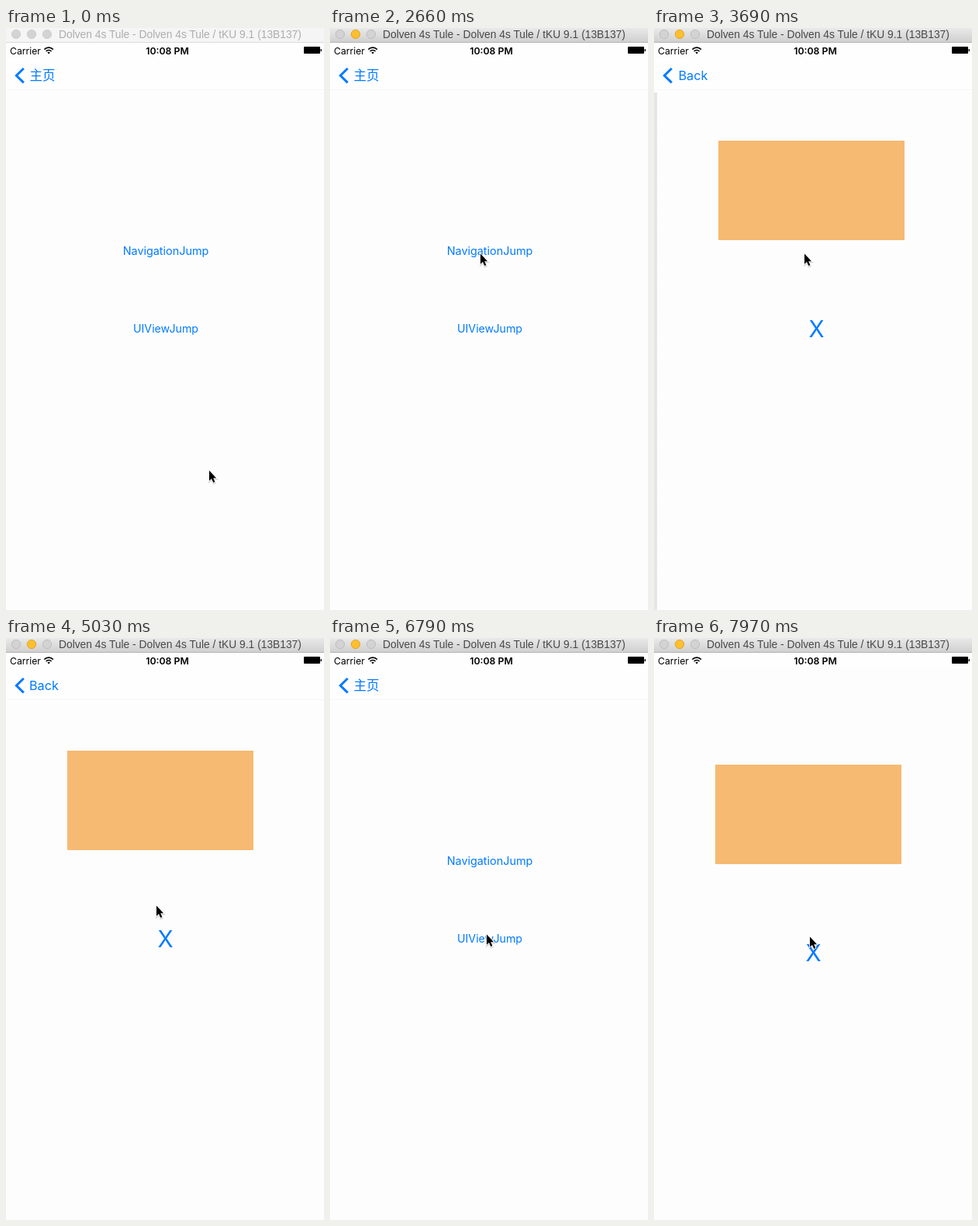
Write an HTML page that moves like this. It is 410 by 749 pixels and loops after 8 s.

```html
<!DOCTYPE html>
<html lang="en">
<head>
<meta charset="utf-8">
<title>View jump</title>
<style>
  html, body { margin: 0; width: 100%; height: 100%; overflow: hidden; background: #fdfdfd; }
  svg { display: block; width: 100%; height: 100%; }
  text { font-family: Inter, sans-serif; }
  .blue { fill: #007aff; }
  .mid { text-anchor: middle; }
  .title { font: 13.8px "Liberation Sans", Arial, sans-serif; }
  .cjk { font-family: "Noto Sans CJK SC", "Noto Sans CJK", sans-serif; }
</style>
</head>
<body>
<svg viewBox="0 0 410 749" preserveAspectRatio="none">
  <defs>
    <linearGradient id="bar" x2="0" y2="1">
      <stop stop-color="#e9e9e9"/><stop offset="1" stop-color="#d0d0d0"/>
    </linearGradient>
    <linearGradient id="edge">
      <stop stop-color="#000" stop-opacity="0"/><stop offset="1" stop-color="#000" stop-opacity=".25"/>
    </linearGradient>
    <g id="card">
      <rect width="410" height="730" y="19" fill="#fdfdfd"/>
      <rect x="79" y="145" width="240" height="128" fill="#f6ba72"/>
    </g>
  </defs>

  <rect width="410" height="749" fill="#fdfdfd"/>
  <g id="home">
    <text class="blue mid" x="206" y="292" font-size="14.4" id="navJump">NavigationJump</text>
    <text class="blue mid" x="206" y="392" font-size="14.2" id="viewJump">UIViewJump</text>
  </g>
  <rect id="dim" y="83" width="410" height="666"/>

  <g id="page">
    <rect id="shadow" x="-7" y="83" width="7" height="666" fill="url(#edge)"/>
    <use href="#card"/>
    <text class="blue mid" x="205.5" y="398" font-size="29.5" id="close">X</text>
  </g>

  <rect y="19" width="410" height="64" fill="#fefefe"/>
  <rect y="79" width="410" height="1" fill="#f5f5f5"/>
  <rect id="navTint" y="19" height="64"/>
  <path d="M22.8 52 13.4 61.2 22.8 70.4" fill="none" stroke="#007aff" stroke-width="3"/>
  <text class="blue cjk" x="30.5" y="67" font-size="16.5" id="homeLabel">主页</text>
  <text class="blue" x="30" y="67" font-size="16.2" id="backLabel">Back</text>

  <g id="modal">
    <use href="#card"/>
    <text class="blue mid" x="205.5" y="398" font-size="29.5">X</text>
  </g>

  <text x="5" y="34" font-size="12.2">Carrier</text>
  <g fill="none" stroke="#000" stroke-width="1.7">
    <path d="M49.4 27.6a8 8 0 0 1 11.4 0M51.6 30a5 5 0 0 1 7 0"/>
    <path d="M53.4 31.6a2.4 2.4 0 0 1 3.4 0L55.1 33.4Z" fill="#000" stroke="none"/>
  </g>
  <text class="mid" x="208" y="34" font-size="12.3" font-weight="600">10:08 PM</text>
  <rect x="384" y="24" width="21" height="9" rx="1"/>
  <rect x="405.6" y="27" width="1.4" height="3.2" rx=".7"/>

  <rect id="titleBar" width="410" height="18"/>
  <rect id="titleLine" y="18" width="410" height="1"/>
  <g stroke-width="1">
    <circle cx="13" cy="8" r="5.6" class="dot"/>
    <circle cx="33" cy="8" r="5.6" class="dot" id="amber"/>
    <circle cx="53" cy="8" r="5.6" class="dot"/>
  </g>
  <text class="title" x="68" y="13" id="title">Dolven 4s Tule - Dolven 4s Tule / tKU 9.1 (13B137)</text>

  <g id="cursor">
    <path d="M0 1.5V15L3.1 12.2 5.5 17.2 7.7 16.2 5.5 11.3H9.5Z" opacity=".18" stroke="#000" stroke-width="2"/>
    <path d="M0 .5V13.7L3 11 5.3 16 7.4 15 5.2 10.2H9.1Z" stroke="#fff" stroke-width="1.6" paint-order="stroke"/>
  </g>
</svg>
<script>
const LOOP = 8000, W = 410, H = 730;
const $ = id => document.getElementById(id);
const set = (id, attrs) => { for (const k in attrs) $(id).setAttribute(k, attrs[k]); };
const clamp = v => Math.max(0, Math.min(1, v));

// bursts of activity: first step, last step, number of steps
const bursts = [
  [450, 890, 4], [1480, 2510, 8], [2660, 2660, 1], [3250, 3990, 6], [4590, 5620, 8],
  [5770, 5770, 1], [6060, 6790, 6], [7240, 7530, 3], [7820, 7970, 2]
];

// pointer path: time, x, y
const path = [
  [300, 262, 569], [740, 266, 633], [890, 265, 618], [1330, 265, 618], [2510, 194, 304],
  [2660, 194, 290], [4440, 194, 290], [5030, 194, 344], [5620, 194, 382],
  [5770, 202, 381], [7090, 202, 381], [7240, 201, 384]
];

function snap(t) {
  let s = 0;
  for (const [a, b, n] of bursts) {
    if (t < a) break;
    const dt = (b - a) / Math.max(1, n - 1);
    s = dt ? a + dt * Math.min(n - 1, Math.floor((t - a + 6) / dt)) : a;
  }
  return s;
}

function pointer(t) {
  const i = path.findIndex(p => p[0] > t);
  if (i === 0) return path[0].slice(1);
  if (i < 0) return path[path.length - 1].slice(1);
  const [a, x, y] = path[i - 1], [b, u, v] = path[i];
  let k = (t - a) / (b - a);
  if (b - a > 1000) k = (1 - Math.cos(Math.PI * k)) / 2;
  return [x + (u - x) * k, y + (v - y) * k];
}

// critically damped spring, distance left from 1 to 0
function spring(t, start, rate) {
  const k = Math.max(0, t - start) * rate / 1000;
  return (1 + k) * Math.exp(-k);
}

// pressed button text fades back in
const press = (t, at) => t < at ? 1 : .2 + .8 * clamp((t - at) / 288) ** 2;

function draw(now) {
  const t = snap(now % LOOP);
  const active = t >= 739;
  set('titleBar', { fill: active ? 'url(#bar)' : '#f5f5f5' });
  set('titleLine', { fill: active ? '#b4b4b4' : '#dadada' });
  set('title', { fill: active ? '#484848' : '#adadad' });
  document.querySelectorAll('.dot').forEach(d => {
    const lit = active && d.id === 'amber';
    d.setAttribute('fill', lit ? '#fdbf2e' : '#d3d3d3');
    d.setAttribute('stroke', lit ? '#e0a52a' : active ? '#bdbdbd' : '#cecece');
  });

  // 1 = page off to the right, 0 = page in place
  const away = t < 6000 ? spring(t, 3250, 15) : 1 - spring(t, 6105, 15);
  const shown = 1 - away, left = Math.round(W * away);
  set('home', { transform: `translate(${Math.round(-.3 * W * shown)} 0)` });
  set('dim', { opacity: .09 * shown });
  set('shadow', { opacity: away });
  set('page', {
    transform: `translate(${left} 0)`,
    visibility: away > .998 ? 'hidden' : 'visible'
  });
  // the dimmed page glows softly through the bar
  set('navTint', { width: Math.min(W, left + 18), opacity: .18 * away * shown });
  set('backLabel', { x: 30 + 150 * away, opacity: clamp(1 - 1.5 * away) });
  set('homeLabel', { x: 30.5 - 120 * shown, opacity: clamp(1 - 2 * shown) });

  set('navJump', { opacity: t < 6000 ? press(t, 3250) : 1 });
  set('close', { opacity: press(t, 6060) });
  set('viewJump', { opacity: press(t, 7240) });

  const drop = Math.round(H * spring(t, 7755, 26));
  set('modal', {
    transform: `translate(0 ${drop})`,
    visibility: drop < H ? 'visible' : 'hidden'
  });

  const [x, y] = pointer(t).map(Math.round);
  set('cursor', { transform: `translate(${x} ${y})` });
}

const begin = performance.now();
function tick() {
  draw(performance.now() - begin);
  requestAnimationFrame(tick);
}
tick();
</script>
</body>
</html>
```
